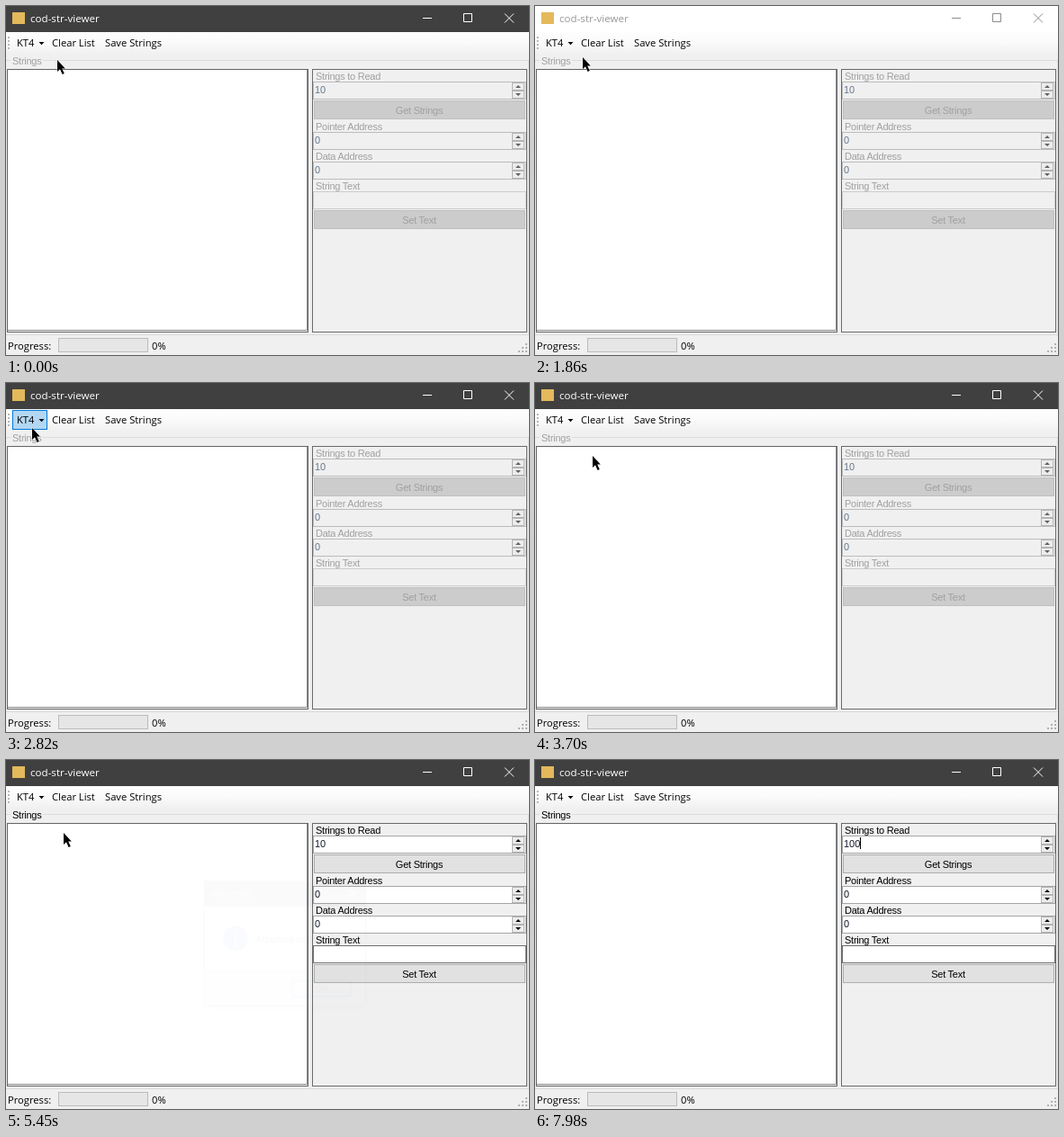
Write an HTML page that moves like this. It is 581 by 388 pixels and loops after 8000 ms.

```html
<!DOCTYPE html>
<html lang="en">
<head>
<meta charset="utf-8">
<title>cod-str-viewer</title>
<style>
  html, body { margin: 0; width: 100%; height: 100%; overflow: hidden; background: #f0f0f0; }
  svg { display: block; width: 581px; height: 388px; }
  text { font: 11.2px "Open Sans", "Noto Sans", sans-serif; white-space: pre; }
  .cap { font-size: 11.6px; }
  .form { font: 11px "Liberation Sans", Arial, sans-serif; letter-spacing: -.25px; }
  .num { letter-spacing: 0; }
  .mid { text-anchor: middle; }
</style>
</head>
<body>
<svg id="stage" viewBox="0 0 581 388" xmlns="http://www.w3.org/2000/svg">
  <defs>
    <linearGradient id="bar" x2="0" y2="1">
      <stop offset="0" stop-color="#fefefe"/><stop offset=".5" stop-color="#fafafa"/><stop offset="1" stop-color="#f0f0f0"/>
    </linearGradient>
    <filter id="shade" x="-20%" y="-20%" width="140%" height="145%">
      <feDropShadow dx="0" dy="4" stdDeviation="6" flood-color="#000" flood-opacity=".38"/>
    </filter>
    <filter id="soft" x="-10%" y="-10%" width="120%" height="130%">
      <feDropShadow dx="3" dy="3" stdDeviation="1" flood-color="#000" flood-opacity=".35"/>
    </filter>
  </defs>
</svg>
<script>
const LOOP = 8000;
const stage = document.getElementById('stage');

function add(parent, tag, attrs, content) {
  const el = document.createElementNS('http://www.w3.org/2000/svg', tag);
  for (const k in attrs) el.setAttribute(k, attrs[k]);
  if (content !== undefined) el.textContent = content;
  parent.appendChild(el);
  return el;
}
const group = (parent = stage) => add(parent, 'g', {});
const fill = (p, x, y, w, h, color) => add(p, 'rect', { x, y, width: w, height: h, fill: color });
const box = (p, x, y, w, h, color, line) =>
  add(p, 'rect', { x: x + .5, y: y + .5, width: w - 1, height: h - 1, fill: color, stroke: line });
const text = (p, x, y, s, color = '#000', cls = '') => add(p, 'text', { x, y, fill: color, class: cls }, s);
const path = (p, d, attrs) => add(p, 'path', { d, fill: 'none', ...attrs });
const show = (el, on) => el.setAttribute('display', on ? 'inline' : 'none');

// Last row whose time has been reached
const at = (rows, t) => rows.reduce((best, row) => row[0] <= t ? row : best, rows[0]);
const within = (t, ...spans) => spans.some(([a, b]) => t >= a && t < b);

// Title bar
fill(stage, 0, 0, 581, 388, '#f0f0f0');
const titleBar = fill(stage, 0, 0, 581, 29, '#404040');
fill(stage, 7, 7, 14, 13, '#e3b95c');
const title = text(stage, 27, 18, 'cod-str-viewer', '#fff', 'cap');
const captionIcons = path(stage, 'M463 13.5h10M508.5 8.5h9v9h-9zM554 8.5l10 10M564 8.5l-10 10', { 'stroke-width': 1 });

// Tool bar
fill(stage, 0, 29, 581, 25, 'url(#bar)');
for (let y = 34; y < 49; y += 4) fill(stage, 2, y, 2, 2, '#b8b8b8');
const toolButton = box(stage, 7, 30, 39, 22, '#b3d7f3', '#0078d7');
text(stage, 12, 45, 'KT4');
path(stage, 'M36.5 40h6l-3 3.2z', { fill: '#000' });
text(stage, 51, 45, 'Clear List');
text(stage, 110, 45, 'Save Strings');

// Group box and list
path(stage, 'M0 60.5h5M41 60.5h540M580.5 60v304', { stroke: '#dcdcdc' });
box(stage, 1, 70, 335, 293, '#fff', '#646464');
path(stage, 'M2 360.5h332.5V71', { stroke: '#8a8d94' });
fill(stage, 2, 361, 333, 1, '#f0f0f0');
box(stage, 340, 70, 239, 293, '#f0f0f0', '#6a6a6a');

// Parts that follow the enabled state: [element, attribute, disabled, enabled]
const states = [];
function react(el, attr, off, on) { states.push([el, attr, off, on]); return el; }
function label(x, y, s, cls = '') {
  react(text(stage, x, y, s, '#000', 'form ' + cls), 'fill', '#a0a0a0', '#000');
}
function spinner(y, value) {
  const frame = box(stage, 341, y, 237, 20, '#fff', '#b0b0b0');
  react(frame, 'fill', '#f0f0f0', '#fff');
  react(frame, 'stroke', '#bcbcbc', '#a6a6a6');
  for (const dy of [1, 10]) box(stage, 562, y + dy, 14, 9, '#ececec', '#b4b4b4');
  const marks = path(stage, `M566 ${y + 7}h6l-3 -3zM566 ${y + 13}h6l-3 3z`, {});
  react(marks, 'fill', '#606060', '#000');
  return react(text(stage, 343, y + 13, value, '#000', 'form num'), 'fill', '#64788f', '#101828');
}
function button(y, s) {
  const face = box(stage, 342, y, 235, 21, '#e1e1e1', '#adadad');
  react(face, 'fill', '#cccccc', '#e1e1e1');
  react(face, 'stroke', '#bfbfbf', '#adadad');
  label(459, y + 15, s, 'mid');
}
label(7, 65, 'Strings');
label(344, 82, 'Strings to Read');
const count = spinner(84, '10');
button(105, 'Get Strings');
label(344, 138, 'Pointer Address');
spinner(140, '0');
label(344, 171, 'Data Address');
spinner(173, '0');
label(344, 204, 'String Text');
const entry = box(stage, 341, 206, 237, 20, '#fff', '#7a7a7a');
react(entry, 'fill', '#f0f0f0', '#fff');
react(entry, 'stroke', '#cccccc', '#6e6e6e');
button(227, 'Set Text');
const caret = fill(stage, 355, 86, 1, 13, '#000');

// Status bar
fill(stage, 0, 365, 581, 1, '#dadada');
text(stage, 2, 382, 'Progress:');
box(stage, 58, 369, 100, 16, '#e6e6e6', '#bcbcbc');
text(stage, 162, 382, '0%');
for (let r = 0; r < 3; r++)
  for (let c = 0; c <= r; c++) fill(stage, 577 - c * 4, 375 + r * 4, 2, 2, '#b0b0b0');

// Drop-down menu
const menu = group();
box(menu, 7, 51, 155, 48, '#fdfdfd', '#8c8c8c').setAttribute('filter', 'url(#soft)');
fill(menu, 8, 52, 25, 46, '#f3f3f3');
const hot = box(menu, 9, 53, 151, 22, '#b3d7f3', '#0078d7');
text(menu, 40, 68, 'Connect');
text(menu, 40, 90, 'Attach');

// Message box
const dialog = group();
fill(dialog, 212, 128, 196, 152, '#505050').setAttribute('filter', 'url(#shade)');
fill(dialog, 213, 129, 194, 30, '#404040');
fill(dialog, 213, 159, 194, 78, '#fff');
fill(dialog, 213, 237, 194, 42, '#f0f0f0');
const heading = text(dialog, 221, 148, '', '#fff', 'cap');
path(dialog, 'M387 138.5l10 10M397 138.5l-10 10', { stroke: '#fff' });
add(dialog, 'circle', { cx: 250, cy: 198, r: 15, fill: '#0078d7' });
fill(dialog, 249, 194, 2, 13, '#fff');
add(dialog, 'circle', { cx: 250, cy: 190, r: 1.6, fill: '#fff' });
const message = text(dialog, 275, 203, '');
message.style.fontSize = '11px';
add(dialog, 'rect', { x: 319, y: 249, width: 71, height: 19, fill: '#e1e1e1', stroke: '#0078d7', 'stroke-width': 2 });
text(dialog, 354.5, 263, 'OK', '#000', 'mid');

// Pointer
const pointer = group();
const ring = add(pointer, 'circle', { cx: -1, cy: -2, r: 12, fill: '#ff0', 'fill-opacity': .47 });
const arrow = path(pointer, 'M0 0v13l3 -2.8l2.6 5.8l2.2 -1l-2.6 -5.6h3.6z',
  { fill: '#000', stroke: '#fff', 'stroke-width': .8, 'paint-order': 'stroke' });
const beam = path(pointer, 'M-3.5 -7.5h2.5l1 1l1 -1h2.5M0 -6.5v13M-3.5 7.5h2.5l1 -1l1 1h2.5', { stroke: '#000' });

// [time, x, y]
const moves = [
  [0, 57, 60], [80, 53, 60], [230, 47, 58], [300, 41, 56], [380, 35, 54], [550, 36, 50],
  [850, 45, 54], [930, 53, 57], [2500, 51, 57], [2750, 40, 53], [2820, 29, 50],
  [3240, 48, 66], [3320, 64, 81], [5840, 72, 84], [5920, 105, 85], [6000, 165, 80],
  [6080, 235, 73], [6160, 295, 68], [6240, 340, 70], [6310, 370, 76], [6390, 385, 90],
  [6470, 390, 85], [6790, 391, 91], [6870, 393, 98]
];
// [time, opacity, scale]
const fades = [
  [0, 0, 1], [1950, .35, .94], [2030, .85, .98], [2110, 1, 1],
  [2270, .6, .97], [2350, .25, .94], [2420, .06, .92], [2500, 0, 1],
  [4820, .35, .94], [4890, .85, .98], [4960, 1, 1],
  [5270, .6, .97], [5350, .2, .94], [5450, .02, .92], [5520, 0, 1]
];

function draw(t) {
  const inactive = within(t, [1860, 2270], [4750, 5270]);
  titleBar.setAttribute('fill', inactive ? '#fff' : '#404040');
  title.setAttribute('fill', inactive ? '#999' : '#fff');
  captionIcons.setAttribute('stroke', inactive ? '#8c8c8c' : '#fff');

  const enabled = t >= 5270;
  for (const [el, attr, off, on] of states) el.setAttribute(attr, enabled ? on : off);

  const open = within(t, [550, 1780], [2990, 3700]);
  show(menu, open);
  show(toolButton, open || within(t, [2820, 2990]));
  toolButton.setAttribute('fill', open ? '#f6f6f6' : '#b3d7f3');
  toolButton.setAttribute('stroke', open ? '#8c8c8c' : '#0078d7');
  show(hot, within(t, [850, 1780], [3240, 3700]));
  hot.setAttribute('y', t >= 3320 ? 75.5 : 53.5);

  const [, alpha, scale] = at(fades, t);
  show(dialog, alpha > 0);
  dialog.setAttribute('opacity', alpha);
  dialog.setAttribute('transform', `translate(310 204) scale(${scale}) translate(-310 -204)`);
  heading.textContent = t < 4000 ? 'Connected' : 'Attached';
  message.textContent = t < 4000 ? 'Connected to target' : 'Attached to process';

  const typed = t >= 7980;
  count.textContent = typed ? '100' : '10';
  caret.setAttribute('x', typed ? 361 : 355);
  show(caret, typed || within(t, [7030, 7580]));

  const [, x, y] = at(moves, t);
  const overText = t >= 6390;
  pointer.setAttribute('transform', `translate(${x} ${y})`);
  show(pointer, !typed);
  show(arrow, !overText);
  show(beam, overText);
  show(ring, within(t, [550, 700], [1630, 1780], [2990, 3070], [3550, 3700], [7030, 7180]));
}

const start = performance.now();
function tick() {
  draw((performance.now() - start) % LOOP);
  requestAnimationFrame(tick);
}
tick();
</script>
</body>
</html>
```
